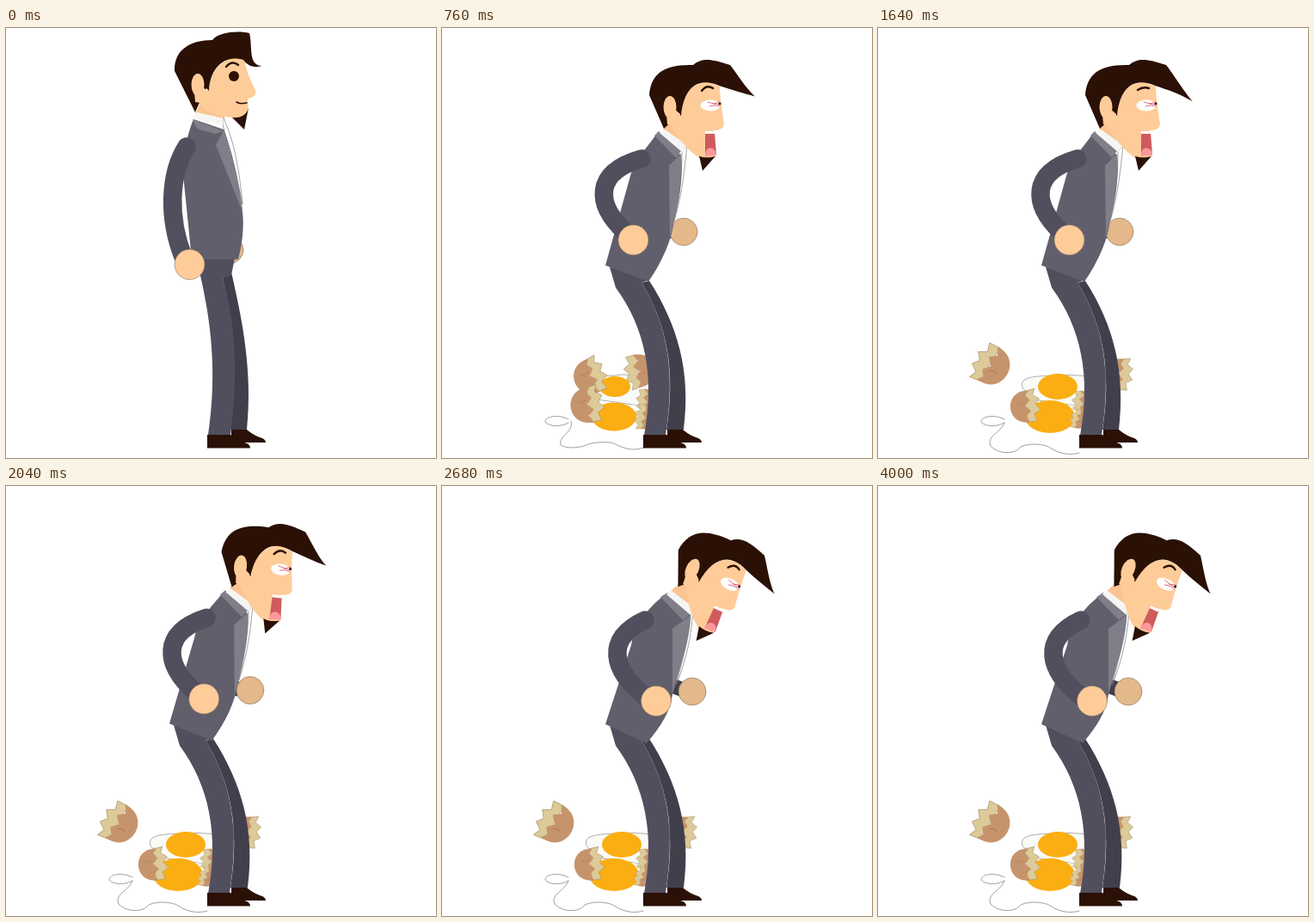
Animation, 500 px wide and 500 px high, one loop 4.04 s. Source, as an HTML page with a canvas:

```html
<!DOCTYPE html>
<html>
<head>
<meta charset="utf-8">
<style>
html, body { margin: 0; width: 100%; height: 100%; overflow: hidden; background: #fff }
canvas { display: block }
</style>
</head>
<body>
<canvas id="stage" width="500" height="500"></canvas>
<script>
const ctx = document.getElementById('stage').getContext('2d');
const LOOP = 4040;
const SKIN = '#fecc99', HAIR = '#2a1005', SUIT = '#625f6c', SLEEVE = '#514f5e',
      SHADE = '#413f4c', LAPEL = '#807e88', SHELL = '#c6946c', CREAM = '#dcca99', YOLK = '#fbae12';

const lerp = (a, b, k) => a + (b - a) * k;
const ramp = (t, from, to) => Math.min(1, Math.max(0, (t - from) / (to - from)));
const smooth = k => .5 - .5 * Math.cos(Math.PI * k);

// Blends two path strings that share one structure.
function mix(a, b, k) {
  const to = b.match(/-?\d+(\.\d+)?/g);
  let i = 0;
  return a.replace(/-?\d+(\.\d+)?/g, n => lerp(+n, +to[i++], k).toFixed(2));
}
function fill(d, color, edge) {
  const path = new Path2D(d);
  ctx.fillStyle = color;
  ctx.fill(path);
  if (edge) line(path, edge, .6);
}
function line(d, color, width) {
  ctx.strokeStyle = color;
  ctx.lineWidth = width;
  ctx.lineCap = 'round';
  ctx.stroke(new Path2D(d));
}
function oval(x, y, rx, ry, color, edge) {
  const path = new Path2D();
  path.ellipse(x, y, rx, ry, 0, 0, 7);
  fill(path, color, edge);
}
function placed(x, y, angle, scale, draw) {
  ctx.save();
  ctx.translate(x, y);
  ctx.rotate(angle * Math.PI / 180);
  ctx.scale(scale, scale);
  draw();
  ctx.restore();
}

function shell(from, to, k) {
  const [x, y, angle, scale] = from.map((n, i) => lerp(n, to[i], k));
  placed(x, y, angle, scale, () => {
    fill('M-2 -20 L9 -22 L6 -14 L14 -9 L9 -2 L15 5 L7 10 L10 19 L-2 20Z', CREAM, '#a58f62');
    fill('M1 -20 C-31 -23 -31 23 1 20 L-4 12 L3 6 L-4 -1 L2 -8 L-3 -14Z', SHELL);
    line('M-5 -6 L-10 -3 L-13 -5', '#a87850', .7);
  });
}

function eggs(t) {
  if (t < 600) return;
  if (t < 700) {
    const drop = ramp(t, 600, 700) ** 2;
    oval(lerp(216, 205, drop), lerp(320, 405, drop), 19, 23, SHELL);
    oval(lerp(212, 190, drop), lerp(350, 440, drop), 19, 23, SHELL);
    return;
  }
  const spread = ramp(t, 660, 760), settle = 1 - (1 - ramp(t, 760, 1480)) ** 2;
  const white = '#fafaf7', edge = '#777';
  placed(200 * (1 - spread), 465 * (1 - spread), 0, spread, () => {
    fill('M168 418 C162 402 195 406 208 403 C230 404 250 403 262 412 L250 442 L180 432Z', white, edge);
    line('M147 459 C139 464 125 464 120 458 C120 451 136 449 147 455', edge, .7);
    fill(mix('M150 457 C154 470 135 474 138 485 C145 490 163 488 170 484 C180 481 195 481 200 483 C212 490 225 492 234 488 L240 440 L180 435Z',
             'M147 459 C142 472 126 474 131 486 C140 496 160 496 166 487 C176 482 195 484 200 488 C212 496 225 497 234 494 L240 440 L180 435Z', settle), '#fff');
    line(mix('M150 457 C154 470 135 474 138 485 C145 490 163 488 170 484 C180 481 195 481 200 483 C212 490 225 492 234 488',
             'M147 459 C142 472 126 474 131 486 C140 496 160 496 166 487 C176 482 195 484 200 488 C212 496 225 497 234 494', settle), edge, .7);
  });
  shell([226, 399, 170, .95], [283, 403, 368, .9], settle);
  oval(lerp(201, 209, settle), 417, lerp(18, 23, settle), lerp(12, 15, settle), YOLK);
  shell([236, 434, 180, .7], [236, 436, 180, .7], settle);
  oval(200, 452, lerp(26, 29, settle), lerp(16.5, 19, settle), YOLK);
  shell([234, 452, 190, .7], [232, 454, 200, .55], settle);
  shell([176, 404, -20, 1], [128, 390, -148, 1.12], settle);
  shell([173, 438, -8, 1.02], [175, 440, -4, .92], settle);
}

function head(shock, bend, shake) {
  const m = (a, b) => mix(a, b, shock);
  const x = lerp(lerp(223, 265, shock), 291, bend), y = lerp(lerp(66, 92, shock), 97, bend);
  placed(x, y, 24 * bend, 1, () => {
    fill(m('M13 4 C17 -21 32 -33 54 -33 L55 -26 C57 -14 62 -4 67 6 C68 13 64 15 58 16 L58 20 L59 28 C58 36 50 39 40 38 C25 37 10 32 0 20Z',
           'M13 8 C15 -20 30 -29 45 -29 L58 -24 C58 -14 60 0 63 20 C62 25 58 27 52 27 L41 31 L54 56 C50 60 44 60 37 60 C30 58 16 46 0 20Z'), SKIN);
    fill(m('M-3 32 L-27 -16 C-28 -41 -8 -52 17 -52 C25 -62 48 -63 60 -60 C64 -45 58 -22 75 -22 C65 -19 58 -22 53 -29 C30 -36 14 -18 13 7 L10 4 L5 14Z',
           `M-7 25 L-24 -14 C-22 -38 -8 -50 27 -49 C38 -58 48 -56 70 -49 C76 -42 88 -22 ${99 + 2 * shake} ${-13 + 7 * shake} C85 -16 72 -20 57 -25 C32 -36 16 -22 13 10 L10 8 L5 14Z`), HAIR);
    oval(0, 0, 7.5, 13, SKIN);
    fill('M-4 9 L5 2 L12 8 L8 22 L-3 20Z', SKIN);
    fill(m('M40 38 C50 39 57 35 59 27 L54 52Z', 'M34 57 C40 59 46 59 53 57 L38 74Z'), HAIR);
    fill(m('M45 21 L57 21 L57 21 L45 21Z', 'M41 29 L52 29 L54 55 L41 56Z'), '#cf5b5d');
    fill(m('M45 21 C45 21 57 21 57 21Z', 'M41 57 C40 44 54 45 54 56Z'), '#fb989c');
    fill(m('M45 21 L57 21 L57 21 L45 21Z', 'M41 28 L52 28 L52 31 L41 31Z'), '#fff');
    if (shock < .3) line('M45 20 Q49 23 57 21', HAIR, 1.6);
    oval(lerp(42, 47, shock), lerp(-10, -2, shock), 11.5 * shock, 6.5 * shock, '#fff');
    if (shock > .6) {
      line('M44 -6 L51 -4 L58 -6 M46 -1 L52 -2 L58 -1 M50 -4 L57 -3', '#d8506a', .8);
    }
    const pupil = lerp(6, 1.5, shock);
    oval(lerp(42, 58, shock), lerp(-10, -4, shock), pupil, pupil, HAIR);
    line(m('M33 -21 Q40 -29 47 -23', `M37 ${-19 - shake} Q43 ${-27 + 3 * shake} 50 -22`), HAIR, 2.4);
  });
}

function man(t) {
  const shock = smooth(ramp(t, 40, 520)), bend = smooth(ramp(t, 1720, 2600));
  const shake = shock * (.5 - .5 * Math.cos(2 * Math.PI * (t - 2680) / 660));
  const pose = (a, b, c = b) => mix(mix(a, b, shock), c, bend);
  const at = (a, b, c) => lerp(lerp(a, b, shock), c, bend);

  const farX = at(260, 281, 291), farY = at(258, 237, 239);
  line(`M${at(250, 252, 262)} ${at(235, 236, 230)} L${farX - 8} ${farY - 1}`, SHADE, 17);
  oval(farX, farY, 16, 16, '#e3b88b', '#86705a');

  fill(pose('M252 291 L262 284 C275 340 287 400 280 467 L261 467 C268 400 264 340 252 291Z',
            `M232 296 L241 294 C274 345 ${290 - 2 * shake} 400 ${281 - shake} 467 L261 467 C272 400 262 345 232 296Z`), SHADE);
  fill(pose('M222 268 L226 288 C238 340 246 400 235 473 L261 473 C271 400 266 340 252 291 L262 287 L266 268Z',
            'M195 278 L202 302 C236 348 248 405 235 474 L260 473 C272 400 262 345 232 296 L241 293 L241 285Z'), SLEEVE);
  fill('M262 467 L280 467 Q288 474 298 477 Q302 479 302 482 L262 482Z', HAIR);
  fill('M234 473 L261 473 Q270 480 280 483 Q284 485 284 488.5 L234 488.5Z', HAIR);

  fill(pose('M220 100 L232 74 L256 90 L254 106Z', 'M257 119 L268 100 L290 120 L284 137Z',
            'M266 122 L286 105 L302 130 L291 142Z'), '#fac390');
  fill(pose('M253 105 C262 125 270 150 275 205 C268 170 258 135 252 112Z',
            'M285 136 C282 165 279 195 270 224 C277 195 279 170 279 144Z',
            'M292 141 C291 170 285 200 272 232 C280 200 288 175 289 150Z'), '#fff', '#666');
  fill(pose('M218 106 C208 130 204 160 208 190 L216 269 L270 269 C275 250 277 230 275 214 C271 180 262 140 253 118Z',
            'M249 124 C238 140 224 152 219 172 L190 276 L240 295 C256 272 268 245 270 222 C277 195 280 170 278 148Z',
            'M257 128 C240 142 224 160 220 185 L190 277 L238 299 C254 280 266 262 268 242 C277 210 286 180 289 150Z'), SUIT);
  fill(pose('M253 119 L244 136 L275 214 C272 180 262 140 253 119Z',
            'M278 146 L264 160 L265 245 C272 215 280 180 278 146Z',
            'M289 150 L268 166 L268 242 C277 210 288 180 289 150Z'), LAPEL);
  fill(pose('M217 106 L253 120 L243 123 L222 117Z', 'M252 120 L278 143 L272 151 L247 125Z',
            'M262 124 L289 149 L280 156 L254 129Z'), LAPEL);
  fill(pose('M222 98 L253 105 L252 112 L217 106Z', 'M259 118 L285 136 L279 144 L253 122Z',
            'M266 121 L292 141 L289 150 L261 126Z'), '#f5f5f3');
  head(shock, bend, shake);

  line(pose('M210 138 C190 170 188 220 206 266',
            `M232 152 C${176 + shake} 168 ${178 + shake} 205 214 238`,
            'M236 156 C188 178 198 215 238 246'), SLEEVE, 21.5);
  oval(at(213.5, 222.5, 249), at(275, 246.5, 250), 17.5, 17.5, SKIN, '#8c7360');
}

function frame(now) {
  const t = Math.floor(now % LOOP / 40) * 40;
  ctx.fillStyle = '#fff';
  ctx.fillRect(0, 0, 500, 500);
  eggs(t);
  man(t);
  requestAnimationFrame(frame);
}
requestAnimationFrame(frame);
</script>
</body>
</html>
```
